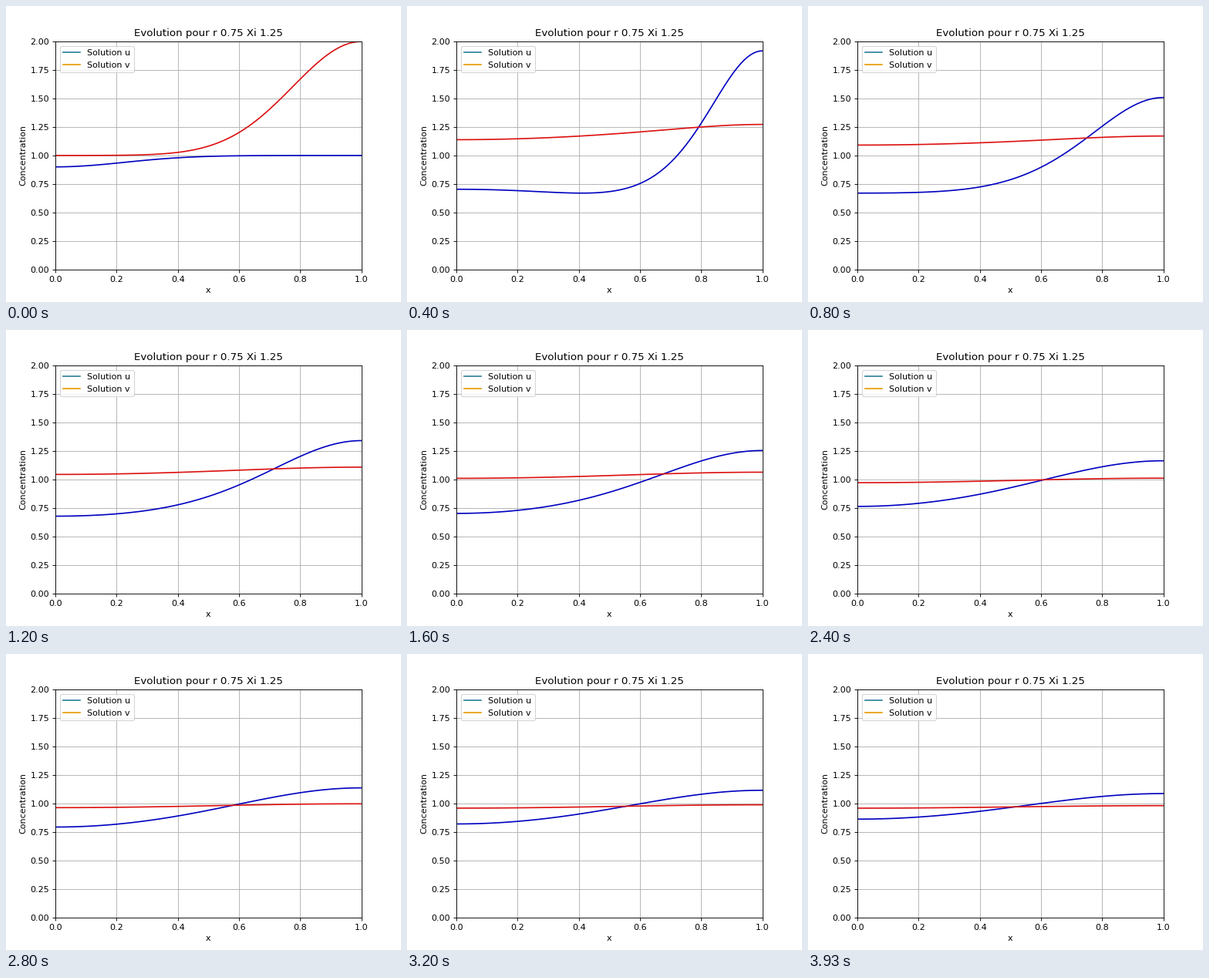
A matplotlib script for the animation above (3990 ms loop, 512 by 384 pixels).

```python
import numpy as np
import matplotlib.pyplot as plt
from matplotlib.animation import FuncAnimation

# Chemotaxis with logistic growth, zero-flux boundaries:
#   u_t = DU u_xx - XI (u v_x)_x + R u (1 - u)
#   v_t = DV v_xx + u - v
R, XI = 0.75, 1.25
DU, DV = 0.1, 1.0
FRAMES, LOOP_MS = 60, 3990
DT = 0.05
N = 101

x = np.linspace(0, 1, N)
h = x[1] - x[0]
cell = np.full(N, h)
cell[[0, -1]] = h / 2


def divergence(flux):
    """Net outflow per cell for fluxes given at the cell faces."""
    return np.diff(flux, prepend=0, append=0) / cell


def implicit_diffusion(rate):
    eye = np.eye(N)
    laplacian = np.column_stack([divergence(np.diff(col) / h) for col in eye])
    return np.linalg.inv(eye - DT * rate * laplacian)


def simulate():
    """One step per frame: diffusion implicit, everything else explicit."""
    spread_u, spread_v = implicit_diffusion(DU), implicit_diffusion(DV)
    u = 1 - 0.1 * np.exp(-10 * x**2)
    v = 1 + np.exp(-10 * (1 - x)**2)
    states = [(u, v)]
    for _ in range(FRAMES - 1):
        drift = XI * (u[1:] + u[:-1]) / 2 * np.diff(v) / h
        growth = R * u * (1 - u)
        u, v = (spread_u @ (u + DT * (growth - divergence(drift))),
                spread_v @ (v + DT * (u - v)))
        states.append((u, v))
    return states


states = simulate()

plt.rcParams["font.family"] = "DejaVu Sans"
fig, ax = plt.subplots(figsize=(6.4, 4.8), dpi=80)
ax.plot([], [], color="#2a7f98", label="Solution u")
ax.plot([], [], color="#e69a00", label="Solution v")
line_u, = ax.plot([], [], color="#0000c0")
line_v, = ax.plot([], [], color="#dc1010")

ax.set(xlim=(0, 1), ylim=(0, 2), xlabel="x", ylabel="Concentration",
       title=f"Evolution pour r {R} Xi {XI}")
ax.grid(True)
ax.legend(loc="upper left")


def update(i):
    u, v = states[i]
    line_u.set_data(x, u)
    line_v.set_data(x, v)
    return line_u, line_v


anim = FuncAnimation(fig, update, frames=FRAMES, interval=LOOP_MS / FRAMES,
                     repeat=True, repeat_delay=0)
plt.show()
```
